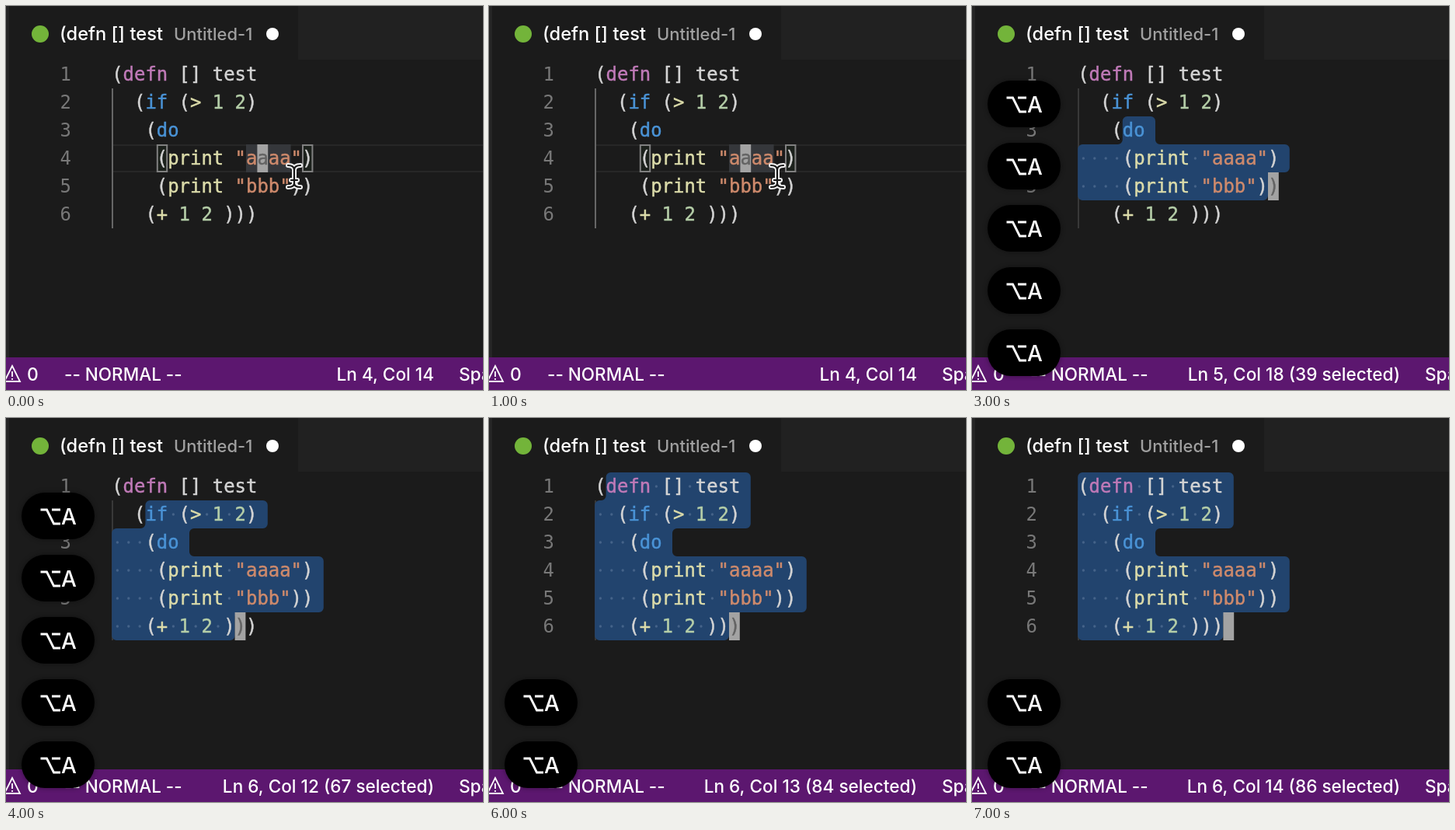
An HTML page with a canvas for the animation above (8 s loop, 614x494 px).

```html
<!DOCTYPE html>
<html lang="en">
<meta charset="utf-8">
<title>Expanding selection</title>
<style>
  html, body { margin: 0; overflow: hidden; background: #1b1b1b; }
  canvas { display: block; }
</style>
<canvas id="stage" width="614" height="494"></canvas>
<script>
const ctx = document.getElementById('stage').getContext('2d');
const MONO = '23.92px "DejaVu Sans Mono", monospace';
const LEFT = 136.2, TOP = 70, ROW = 36, CHAR = 14.4;
const LINES = [
  '(defn [] test',
  '  (if (> 1 2)',
  '   (do',
  '    (print "aaaa")',
  '    (print "bbb"))',
  '   (+ 1 2 )))',
];
const TOKENS = [
  [/"\w+"/g, '#ce8a6c'],
  [/defn/g, '#c07ab8'],
  [/\b(if|do)\b/g, '#4a93d6'],
  [/print|[+>]/g, '#dcdcaa'],
  [/\d/g, '#b5cea8'],
];

// One step per second. sel: start row, start column, end row, end column.
const start = { info: 'Ln 4, Col 14', cursor: [3, 13], pills: 0 };
const STEPS = [
  start,
  start,
  { info: 'Ln 4, Col 18 (12 selected)', sel: [3, 5, 3, 17], cursor: [3, 17], pills: 3 },
  { info: 'Ln 5, Col 18 (39 selected)', sel: [2, 4, 4, 17], cursor: [4, 17], pills: 5 },
  { info: 'Ln 6, Col 12 (67 selected)', sel: [1, 3, 5, 11], cursor: [5, 11], pills: 5 },
  { info: 'Ln 6, Col 13 (69 selected)', sel: [1, 2, 5, 12], pills: 4, fading: true },
  { info: 'Ln 6, Col 13 (84 selected)', sel: [0, 1, 5, 12], cursor: [5, 12], pills: 2 },
  { info: 'Ln 6, Col 14 (86 selected)', sel: [0, 0, 5, 13], cursor: [5, 13], pills: 2 },
];

const colX = col => LEFT + col * CHAR;
const rowY = row => TOP + row * ROW;

function rect(x, y, w, h, color) {
  ctx.fillStyle = color;
  ctx.fillRect(x, y, w, h);
}

function text(str, x, y, color, font, align = 'left') {
  ctx.font = font;
  ctx.fillStyle = color;
  ctx.textAlign = align;
  ctx.fillText(str, x, y);
}

function ui(str, x, y, size, color = '#fff', align) {
  text(str, x, y, color, `500 ${size}px Inter, sans-serif`, align);
}

// The thin outline gives code a slightly heavier weight.
function code(str, row, col, color) {
  text(str, colX(col), rowY(row) + 26, color, MONO);
  ctx.strokeStyle = color;
  ctx.lineWidth = .45;
  ctx.strokeText(str, colX(col), rowY(row) + 26);
}

function disc(x, y, r, color) {
  ctx.fillStyle = color;
  ctx.beginPath();
  ctx.arc(x, y, r, 0, 7);
  ctx.fill();
}

function stroke(path, color, width) {
  ctx.strokeStyle = color;
  ctx.lineWidth = width;
  ctx.stroke(new Path2D(path));
}

function drawSelection([r1, c1, r2, c2]) {
  const points = [];
  for (let r = r1; r <= r2; r++) {
    const right = r === r2 ? colX(c2) : colX(LINES[r].length + 1) - 1;
    points.push([right, rowY(r)], [right, rowY(r + 1)]);
  }
  if (r2 > r1) points.push([LEFT, rowY(r2 + 1)], [LEFT, rowY(r1 + 1)]);
  points.push([colX(c1), rowY(r1 + 1)], [colX(c1), rowY(r1)]);

  ctx.fillStyle = '#22446e';
  ctx.beginPath();
  ctx.moveTo((colX(c1) + points[0][0]) / 2, rowY(r1));
  points.forEach((p, i) => ctx.arcTo(...p, ...points[(i + 1) % points.length], 6));
  ctx.fill();

  for (let r = r1; r <= r2; r++) {
    const from = r === r1 ? c1 : 0, to = r === r2 ? c2 : LINES[r].length;
    for (let c = from; c < to; c++) {
      if (LINES[r][c] === ' ') disc(colX(c + .5), rowY(r) + 18, 1.7, '#456389');
    }
  }
}

function drawIdleMarks() {
  rect(138, 178, 476, 2, '#272727');
  rect(138, 212, 476, 2, '#272727');
  rect(colX(12), 178, CHAR * 4, ROW, '#35373b');
  for (const col of [4, 17]) {
    rect(colX(col), 178, CHAR - .5, ROW, '#1c211c');
    ctx.strokeStyle = '#808080';
    ctx.lineWidth = 2;
    ctx.strokeRect(colX(col) + 1, 179, CHAR - 2, ROW - 2);
  }
}

function drawCode() {
  LINES.forEach((line, row) => {
    text(row + 1, 84, rowY(row) + 26, '#787878', MONO, 'right');
    let plain = line;
    for (const [pattern, color] of TOKENS) {
      for (const m of line.matchAll(pattern)) code(m[0], row, m.index, color);
      plain = plain.replace(pattern, m => ' '.repeat(m.length));
    }
    code(plain, row, 0, '#d4d4d4');
  });
}

function drawPointer() {
  const beam = 'M363 205Q371 205 371 211Q371 205 379 205M371 210V229M367 224H375' +
               'M363 233Q371 233 371 228Q371 233 379 233';
  ctx.lineCap = 'round';
  stroke(beam, '#f4f4f4', 6);
  stroke(beam, '#161616', 2.2);
  ctx.lineCap = 'butt';
}

function drawPill(y, alpha) {
  ctx.globalAlpha = alpha;
  ctx.fillStyle = '#000';
  ctx.shadowColor = 'rgba(0,0,0,.4)';
  ctx.shadowBlur = 6;
  ctx.beginPath();
  ctx.roundRect(20, y, 94, 60, 30);
  ctx.fill();
  ctx.shadowBlur = 0;
  // Option key sign
  stroke(`M44.5 ${y + 22}h8l9 18h8.5M59 ${y + 22}h11`, '#fff', 2.8);
  ui('A', 71, y + 41, 28);
  ctx.globalAlpha = 1;
}

function drawChrome(info) {
  rect(0, 0, 614, 494, '#1b1b1b');
  rect(376, 0, 238, 69, '#212121');
  rect(0, 0, 4, 452, '#262626');
  disc(44, 36, 11, '#73b43a');
  ui('(defn [] test', 69, 44, 23.7);
  ui('Untitled-1', 216, 44, 22, '#a0a0a0');
  disc(343, 36, 8, '#fff');

  rect(0, 452, 614, 42, '#5c176f');
  stroke('M8 463L18 483H-2ZM8 470V477M8 479V481', '#fff', 1.8);
  ui('0', 27, 482, 23);
  ui('-- NORMAL --', 75, 482, 22.5);
  ui(info, 551, 482, 22.6, '#fff', 'right');
  ui('Spaces: 2', 583, 482, 22.6);
}

function draw({ info, sel, cursor, pills, fading }) {
  drawChrome(info);
  if (!sel) drawIdleMarks();
  rect(136, 106, 2, 180, sel ? '#383838' : '#666');
  if (sel) drawSelection(sel);
  drawCode();
  if (cursor) {
    const [row, col] = cursor;
    rect(colX(col), rowY(row), CHAR - .6, ROW, '#a3a3a3');
    code(LINES[row][col] || '', row, col, '#636363');
  }
  if (!sel) drawPointer();
  for (let i = 0; i < pills; i++) {
    drawPill(416 - i * 80, fading && i === pills - 1 ? .35 : 1);
  }
}

function frame() {
  draw(STEPS[Math.floor(performance.now() / 1000) % STEPS.length]);
  requestAnimationFrame(frame);
}
frame();
</script>
</html>
```
